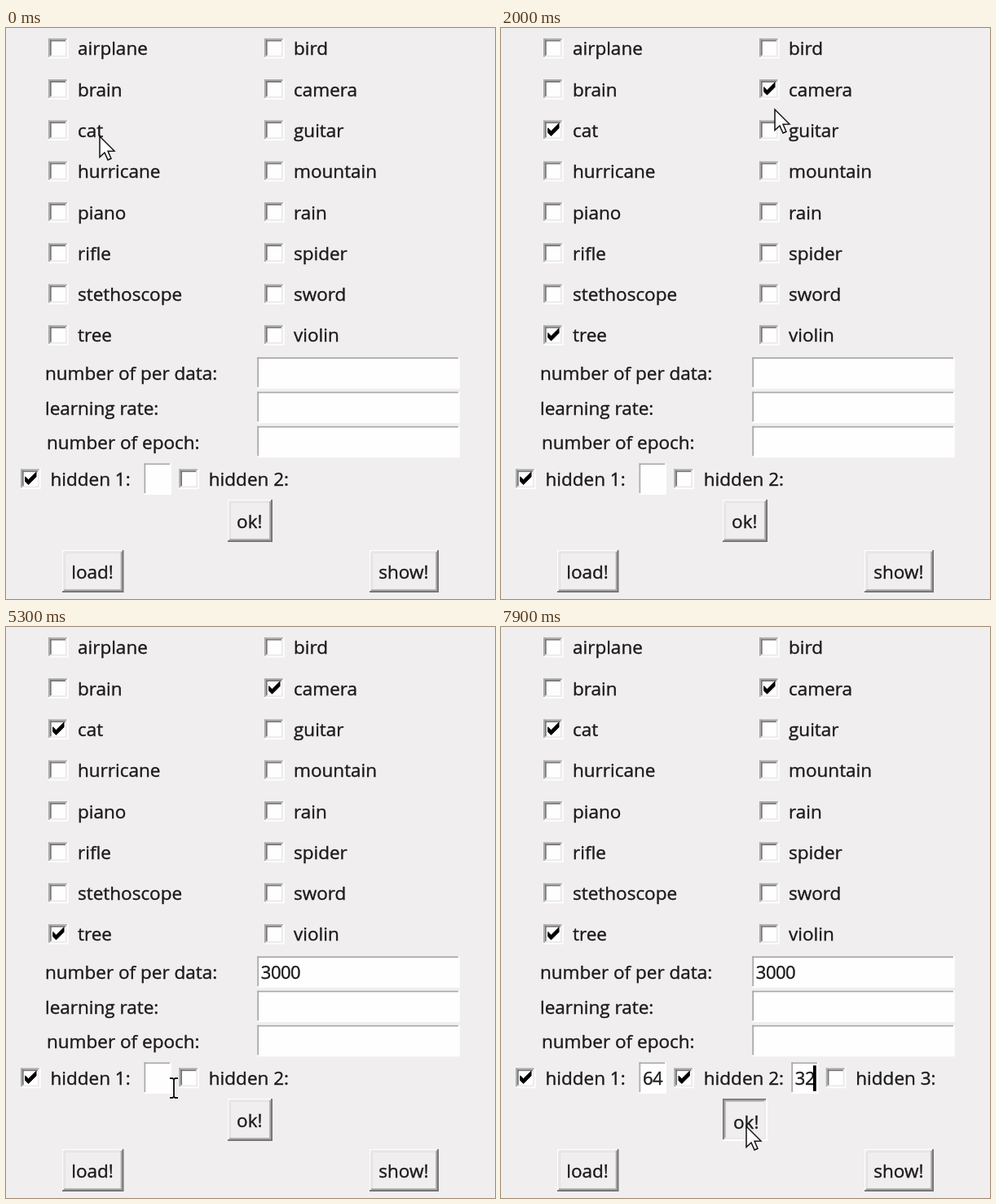
Animation, 600 px wide and 701 px high, one loop 8 s. Source, as an HTML page with a canvas:

```html
<!DOCTYPE html>
<html lang="en">
<head>
<meta charset="utf-8">
<title>Training form</title>
<style>
html, body { margin: 0; width: 100%; height: 100%; overflow: hidden; background: #f0eeef; }
canvas { display: block; }
</style>
</head>
<body>
<canvas id="stage" width="600" height="701"></canvas>
<script>
const ctx = document.getElementById('stage').getContext('2d');
const LOOP = 8000, STEP = 100, PX = 1.9;
const FACE = '#f0eeef', MID = '#a8a8a8', DARK = '#747474', LIGHT = '#ebe9ea', WHITE = '#fefefe', INK = '#1c1c1c';
const LABEL = '22.5px "Open Sans", "Noto Sans", sans-serif';
const ENTRY = '22px "Open Sans", "Noto Sans", sans-serif';

const columns = [
  { x: 52, names: ['airplane', 'brain', 'cat', 'hurricane', 'piano', 'rifle', 'stethoscope', 'tree'] },
  { x: 317, names: ['bird', 'camera', 'guitar', 'mountain', 'rain', 'spider', 'sword', 'violin'] }
];
const checkedAt = { cat: 300, tree: 900, camera: 1900 };
const SECOND_LAYER = 6000, PRESS = 7800;

// Typed text: [time, value]; caret intervals: [on, off]
const perData = { typed: [[3100, '3'], [3300, '30'], [3500, '300'], [3700, '3000']], caret: [[2500, 4300]] };
const units1 = { typed: [[5500, '6'], [5700, '64']], caret: [[4700, 5300], [5500, 6300]] };
const units2 = { typed: [[6800, '3'], [7200, '32']], caret: [[6500, LOOP]] };

// Pointer: [time, x, y, shape]
const track = [
  [0, 115, 133, 'arrow'], [200, 70, 125, 'arrow'], [300, 67, 126, 'arrow'],
  [400, 72, 160, 'arrow'], [700, 68, 350, 'arrow'], [800, 66, 372, 'arrow'],
  [1000, 66, 374, 'arrow'], [1100, 105, 350, 'arrow'], [1300, 229, 279, 'arrow'],
  [1500, 305, 145, 'arrow'], [1700, 332, 80, 'arrow'], [1900, 331, 76, 'arrow'],
  [2000, 336, 100, 'arrow'], [2300, 385, 390, 'arrow'], [2400, 394, 430, 'beam'],
  [2600, 395, 441, 'beam'], [2700, 395, 441, 'beam'], [2800, 393, 445, 'beam'],
  [4200, 393, 445, 'beam'], [4300, 380, 462, 'arrow'], [4600, 235, 551, 'arrow'],
  [4700, 208, 563, 'beam'], [4800, 206, 566, 'beam'], [5700, 206, 566, 'beam'],
  [5800, 216, 561, 'arrow'], [6000, 223, 556, 'arrow'], [6100, 245, 562, 'arrow'],
  [6300, 350, 571, 'arrow'], [6400, 390, 574, 'beam'], [6500, 401, 575, 'beam'],
  [7200, 401, 575, 'beam'], [7300, 384, 583, 'arrow'], [7600, 304, 617, 'arrow'],
  [7800, 301, 613, 'arrow'], [7900, 301, 613, 'arrow']
];

function rect(x, y, w, h, color) {
  ctx.fillStyle = color;
  ctx.fillRect(x, y, w, h);
}

// A hairline stroke gives the slightly heavy screen lettering
function text(str, x, y, font = LABEL, align = 'left') {
  ctx.font = font;
  ctx.textAlign = align;
  ctx.fillStyle = ctx.strokeStyle = INK;
  ctx.lineWidth = 0.4;
  ctx.fillText(str, x, y);
  ctx.strokeText(str, x, y);
}

function polygon(points, x, y, scale) {
  ctx.beginPath();
  for (const [px, py] of points) ctx.lineTo(x + px * scale, y + py * scale);
  ctx.closePath();
}

// One ring of a 3D edge
function edge(x, y, w, h, topLeft, bottomRight) {
  rect(x, y, w, h, bottomRight);
  rect(x, y, w - PX, PX, topLeft);
  rect(x, y, PX, h - PX, topLeft);
}

function bevel(x, y, w, h, outer, inner, face) {
  edge(x, y, w, h, ...outer);
  edge(x + PX, y + PX, w - 2 * PX, h - 2 * PX, ...inner);
  rect(x + 2 * PX, y + 2 * PX, w - 4 * PX, h - 4 * PX, face);
}

function checkbox(x, y, on) {
  bevel(x, y, 24.7, 24.7, [MID, WHITE], [DARK, LIGHT], WHITE);
  if (!on) return;
  polygon([[3, 5], [3, 8], [5, 10], [10, 5], [10, 2], [5, 7]], x, y, PX);
  ctx.fillStyle = ctx.strokeStyle = '#000';
  ctx.lineWidth = 1;
  ctx.fill();
  ctx.stroke();
}

function entry(x, y, w, baseline, field, t) {
  const h = 38.5;
  edge(x, y, w, h, MID, WHITE);
  rect(x + PX, y + PX, w - 2 * PX, h - 2 * PX, WHITE);
  if (!field) return;
  const last = field.typed.filter(([at]) => t >= at).pop();
  const value = last ? last[1] : '';
  const left = x + 4.5;
  ctx.letterSpacing = '-0.5px';
  text(value, left, baseline, ENTRY);
  const width = ctx.measureText(value).width;
  ctx.letterSpacing = '0px';
  if (field.caret.some(([on, off]) => t >= on && t < off)) {
    rect(left + width - 2, baseline - 24, 3.8, 31.5, '#000');
  }
}

function button(label, x, y, w, pressed) {
  const h = 52;
  if (pressed) bevel(x, y, w, h, [DARK, WHITE], [MID, LIGHT], FACE);
  else bevel(x, y, w, h, [WHITE, DARK], [LIGHT, MID], FACE);
  const shift = pressed ? PX : 0;
  text(label, x + w / 2 - 0.7 + shift, y + 34.7 + shift, LABEL, 'center');
}

function layer(n, x, on) {
  checkbox(x, 541.5, on);
  text('hidden ' + n + ':', x + 36.5, 562.3);
}

function drawForm(t) {
  rect(0, 0, 600, 701, FACE);
  for (const { x, names } of columns) {
    names.forEach((name, i) => {
      const y = 12.8 + i * 50.3;
      checkbox(x, y, t >= checkedAt[name]);
      text(name, x + 36, y + 20.5);
    });
  }
  text('number of per data:', 48, 432.3);
  text('learning rate:', 48, 474.5);
  text('number of epoch:', 50, 516.7);
  entry(308.3, 404.3, 248.5, 432, perData, t);
  entry(308.3, 446.6, 248.5, 474, null, t);
  entry(308.3, 488.8, 248.5, 516, null, t);

  const second = t >= SECOND_LAYER;
  layer(1, 18, true);
  entry(169.5, 534.5, 33.5, 562.3, units1, t);
  layer(2, 212.3, second);
  if (second) {
    entry(356.3, 534.5, 33.5, 562.3, units2, t);
    layer(3, 398.8, false);
  }
  button('ok!', 272, 579, 55, t >= PRESS);
  button('load!', 69, 641, 75.5, false);
  button('show!', 446, 641, 85, false);
}

function drawArrow(x, y) {
  polygon([[0, 0], [0, 17], [4, 13.3], [6.7, 19.3], [9.3, 18.2], [6.7, 12.2], [12, 12]], x, y, 1.5);
  ctx.fillStyle = '#fff';
  ctx.fill();
  ctx.strokeStyle = '#111';
  ctx.lineWidth = 1.5;
  ctx.stroke();
}

function drawBeam(x, y) {
  ctx.beginPath();
  for (const s of [-1, 1]) {
    ctx.moveTo(x - 5, y + 12 * s);
    ctx.lineTo(x - 1.5, y + 12 * s);
    ctx.lineTo(x, y + 10.5 * s);
    ctx.lineTo(x + 1.5, y + 12 * s);
    ctx.lineTo(x + 5, y + 12 * s);
  }
  ctx.moveTo(x, y - 10.5);
  ctx.lineTo(x, y + 10.5);
  for (const [color, width] of [['#fff', 4], ['#111', 1.9]]) {
    ctx.strokeStyle = color;
    ctx.lineWidth = width;
    ctx.stroke();
  }
}

function drawPointer(t) {
  const next = track.findIndex(([at]) => at > t);
  const a = track[next < 0 ? track.length - 1 : next - 1];
  const b = next < 0 ? a : track[next];
  const k = a === b ? 0 : (t - a[0]) / (b[0] - a[0]);
  const x = a[1] + (b[1] - a[1]) * k;
  const y = a[2] + (b[2] - a[2]) * k;
  (a[3] === 'beam' ? drawBeam : drawArrow)(x, y);
}

const start = performance.now();
function frame() {
  const elapsed = (performance.now() - start) % LOOP;
  const t = Math.floor(elapsed / STEP) * STEP;
  drawForm(t);
  drawPointer(t);
  requestAnimationFrame(frame);
}
frame();
</script>
</body>
</html>
```
